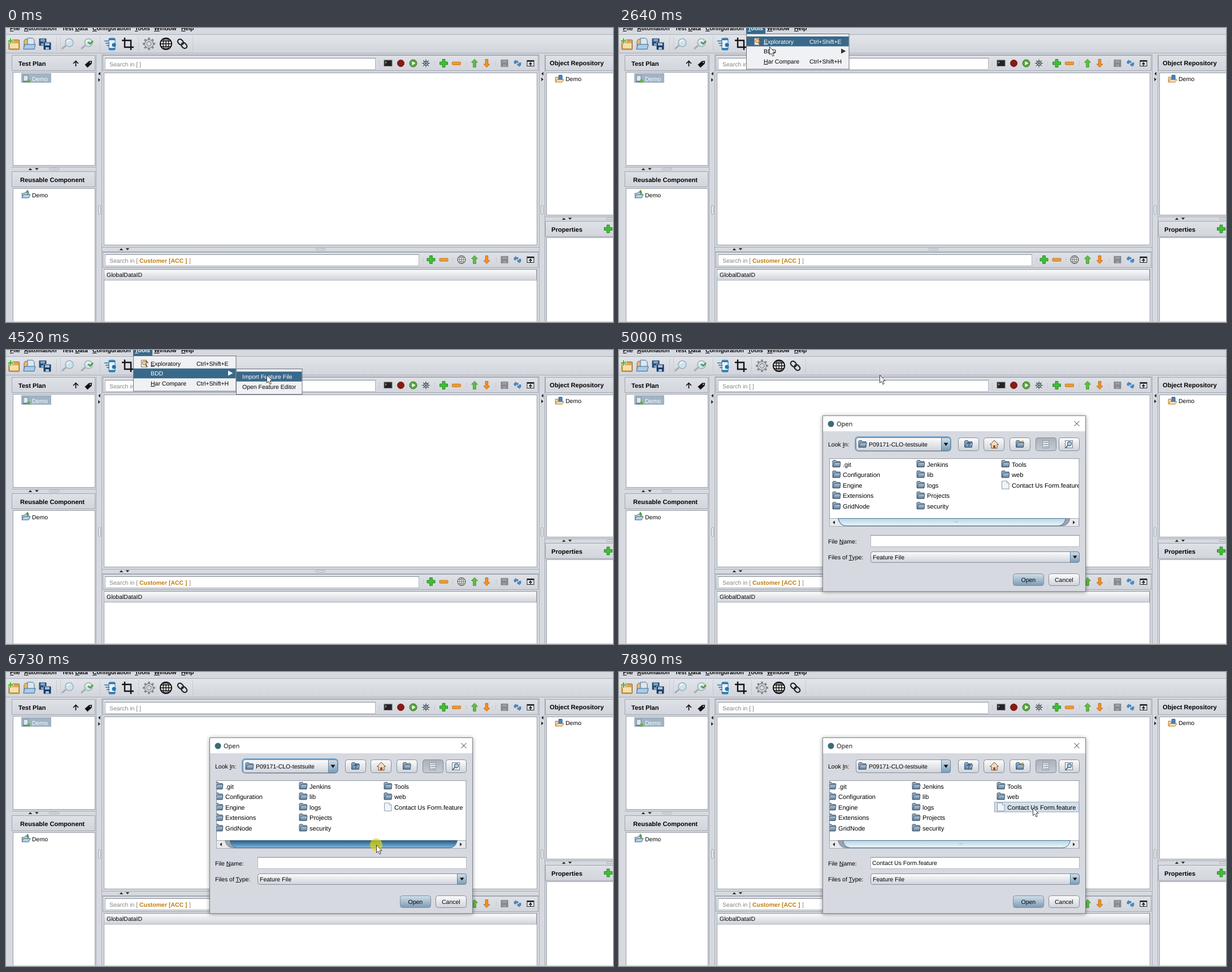
These frames come from a looping animation (1074 by 521 pixels, 8 s). An HTML page:

```html
<!DOCTYPE html>
<html lang="en">
<head>
<meta charset="utf-8">
<title>Importing a feature file</title>
<style>
html, body { margin: 0; width: 100%; height: 100%; overflow: hidden; background: #d6d9df; }
svg { display: block; width: 1074px; height: 521px; }
text { font: 10.5px "Liberation Sans", Arial, sans-serif; white-space: pre; text-rendering: geometricPrecision; }
.b { font-weight: bold; }
.h { font-weight: bold; font-size: 11.1px; }
.m { font-weight: bold; font-size: 10.35px; }
.f { font-size: 11.1px; }
.w { font: 11px "Open Sans", "Noto Sans", sans-serif; }
.frame { filter: drop-shadow(0 1px 3.5px #0006); }
tspan { text-decoration: underline; }
.row rect { fill: none; }
.row path { fill: #333; }
.on rect { fill: #39698a; }
.on text, .on path { fill: #fff; }
</style>
</head>
<body>
<svg id="stage" viewBox="0 0 1074 521"></svg>
<script>
// "_" before a letter marks its keyboard mnemonic
const text = (x, y, s, cls = '', fill = '#000') =>
  `<text x="${x}" y="${y}" class="${cls}" fill="${fill}">${s.replace(/_(.)/, '<tspan>$1</tspan>')}</text>`;
const rect = (x, y, w, h, fill, stroke = 'none', r = 0) =>
  `<rect x="${x}" y="${y}" width="${w}" height="${h}" fill="${fill}" stroke="${stroke}" rx="${r}"/>`;
const path = (d, fill = 'none', stroke = 'none', w = 1) =>
  `<path d="${d}" fill="${fill}" stroke="${stroke}" stroke-width="${w}"/>`;
const circle = (x, y, r, fill, stroke = 'none', w = 1) =>
  `<circle cx="${x}" cy="${y}" r="${r}" fill="${fill}" stroke="${stroke}" stroke-width="${w}"/>`;
const group = (id, body, attrs = '') => `<g id="${id}" ${attrs}>${body}</g>`;
const icon = (name, x, y) => `<use href="#${name}" x="${x}" y="${y}"/>`;
const grad = (id, a, b) => `<linearGradient id="${id}" x2="0" y2="1"><stop stop-color="${a}"/><stop offset="1" stop-color="${b}"/></linearGradient>`;
const dots = (x, y, h) => `<path d="M${x} ${y}v${h}" stroke="#a3a8b1" stroke-dasharray="1 2"/>`;
const pane = (x, y, w, h) => rect(x + .5, y + .5, w, h, '#fff', '#979ca6');
const header = (x, y, w, h = 27) => rect(x + .5, y + .5, w, h, 'url(#head)', '#a0a5af');
const field = (x, y, w, h) => rect(x + .5, y + .5, w, h, '#fff', '#b3b7bf') + path(`M${x} ${y + .5}h${w + 1}`, 'none', '#858a93');
const button = (x, y, w, h, fill = 'light') => rect(x + .5, y + .5, w, h, `url(#${fill})`, '#858c98', 4);
const grip = (x, y, w, h) => rect(x + .5, y + .5, w, h, '#e3e6eb', '#a0a5ae', 2);
const tri = (x, y, turn) => `<path d="M-3.3 1.8L0-1.8 3.3 1.8z" fill="#222" transform="translate(${x} ${y}) rotate(${turn})"/>`;

const floppy = (c, light) => rect(-6.5, -6.5, 13, 13, c, 'none', 1) + rect(-4, -5.5, 8, 4.5, light) + rect(-3, 2, 6, 4, light);
const globe = (r, c, w) => circle(0, 0, r, '#f4f4f4', c, w) +
  path(`M${-r} 0H${r}M0 ${-r}V${r}M${-r * .85} ${-r * .5}H${r * .85}M${-r * .85} ${r * .5}H${r * .85}`, 'none', c, w * .7) +
  `<ellipse rx="${r * .5}" ry="${r}" fill="none" stroke="${c}" stroke-width="${w * .7}"/>`;
const arrow = (fill, edge) => path('M0-7.2L5.5-1.5H2.3V7H-2.3V-1.5H-5.5z', fill, edge, .9);
const lens = path('M-3 3L-10 9', 'none', '#a9adb2', 3) + circle(3, -2, 7, '#c9e4f1', '#a5aeb8', 1.6) + path('M-1-3q2-5 6-3', 'none', '#fff', 1.5);
const gear = (r, hole, c, w) => Array.from({ length: 8 }, (_, i) =>
  `<path d="M0 ${-r}V${-r + 4}" stroke="${c}" stroke-width="${w}" transform="rotate(${i * 45})"/>`).join('') + circle(0, 0, r - 3.5, '#dcdfe2', c, 1.3) + circle(0, 0, hole, '#d6d9df', c, 1.3);

const icons = {
  plus: path('M-2.4-7H2.4V-2.4H7V2.4H2.4V7H-2.4V2.4H-7V-2.4H-2.4z', '#43bd35', '#248a20'),
  minus: rect(-7.5, -2.3, 15, 5, '#f09a35', '#c87619', 1),
  up: arrow('#61bd43', '#3e922c'),
  down: `<g transform="rotate(180)">${arrow('#f28e27', '#c06a12')}</g>`,
  floppy: floppy('#85878a', '#9c9ea1'),
  refresh: path('M-6 0V-3L-3-6V-4H1V-1H-3V1zM6-1V3L3 6V4H0V1H3V-1z', '#468bc9', '#2c6da8', .6),
  popout: rect(-6, -5, 12, 10, '#e9edf1', '#222') + path('M-6-4H6', 'none', '#222', 2.5) + path('M0 5V0M-2.5 2L0-1 2.5 2', 'none', '#222', 1.5),
  globe: globe(7, '#555', 1.1),
  bigGlobe: globe(10, '#111', 2),
  console: rect(-7, -5.5, 14, 10.5, '#222', '#666') + path('M-5-3L-3-1.5-5 0', 'none', '#ddd'),
  record: circle(0, 0, 6, '#8b1a13', '#6c1712'),
  play: circle(0, 0, 6.5, '#5aa63e', '#39782b') + path('M-2-3.5L4 0-2 3.5z', '#fff'),
  debug: gear(7, 1, '#33434c', 1),
  gear: gear(11, 4, '#85878a', 3.5),
  newDoc: rect(-9, -7, 18.5, 17, '#d9a755', '#8f6424', 1) + rect(-7, -1, 15, 9, '#f5dfa9') +
    `<g transform="translate(-6 -5) scale(.75)"><path d="M-2-7H2V-2H7V2H2V7H-2V2H-7V-2H-2z" fill="#4bb52f" stroke="#fff"/></g>`,
  openDoc: path('M-9-5L-7-8H-1L1-5H7V8H-9z', '#e3bd78', '#8e6b35') + path('M-3-10H6L9-7V2H-3z', '#dbe8f2', '#4d6f8d') + path('M-10 9.5L-8 1H11L9 9.5z', '#a9cbe6', '#3b6791'),
  saveAll: `<g transform="translate(-4 -3)">${floppy('#254b79', '#7fa3c4')}</g><g transform="translate(4 4)">${rect(-7, -7, 14, 14, '#d6d9df')}${floppy('#173c68', '#a9c3da')}</g>`,
  lens,
  lensOk: lens + path('M2-3L6 0 11-5', 'none', '#4a9f2d', 2.5),
  phone: rect(-3, -10, 11, 21, '#e9f1f7', '#2373ad', 2) + path('M-3-8H8M-3 9H8', 'none', '#2373ad', 3) + path('M-11-5H-3M-9-1H-2M-7 3H-2', 'none', '#2373ad', 1.5) + circle(6, 2, 3.5, '#2373ad'),
  crop: path('M-5-11V6H11M-10-6H6V11', 'none', '#111', 2.4),
  link: `<g transform="rotate(45)" fill="none" stroke="#222" stroke-width="2.2"><rect x="-10" y="-4" width="11" height="8" rx="4"/><rect x="-1" y="-4" width="11" height="8" rx="4"/></g>`,
  upLine: path('M0 5V-4M-4.5 0L0-4.5 4.5 0', 'none', '#111', 1.7),
  tag: `<g transform="rotate(-42)">${path('M-7-3.5H3L7 0 3 3.5H-7z', '#111')}${circle(3, 0, 1.1, '#ddd')}</g>`,
  plan: path('M-5-6H3V4H-5z', '#dce6ed', '#71838f') + path('M-6 5H5', 'none', '#657b89', 2) + circle(4, 4, 3, '#69af46'),
  reuse: path('M-7-2H-3L-1-4H5V5H-6z', '#e8d6a6', '#386e99') + path('M-7 6L-4 0H8L5 6z', '#b5d5ec', '#2f648f') + path('M3 0V-6M1-4L3-7 5-4', 'none', '#54983b', 1.6),
  repo: path('M-7-3H-3L-2-1H5V5H-7z', '#f0d49a', '#b47d36') + rect(-1, -6.5, 6, 8, '#4a84b9', '#2a5a89', 1) + path('M-7 6L-4 1.5H8L5 6z', '#f4dfb3', '#b47d36'),
  explore: rect(-5, -6, 9, 12, '#fff', '#777') + circle(0, -1, 3.6, '#f0c98b', '#a77339') + path('M2 2L6 6M3-5L7-1', 'none', '#6b4b2a', 1.7),
  folder: path('M-6.5 5V-5.5L-5.5-6.5H-1L0-4.5H6.5V5z', '#8fa9bf', '#40566c') + path('M-6 5.5L-3.5-2.5H7.5L6 5.5z', 'url(#folderFill)', '#40566c'),
  file: path('M-6-7H3L6.5-3.5V7H-6z', '#eff4f8', '#8c99a8') + path('M3-7V-3.5H6.5', '#fff', '#8c99a8')
};

const defs = `<defs>${grad('head', '#dee1e6', '#d2d5dc')}${grad('bar', '#e2e5ea', '#d2d5db')}${grad('light', '#fcfcfd', '#cfd3da')}
  ${grad('blue', '#d0dfea', '#7c9bb5')}${grad('pressed', '#abb0b9', '#c6cad2')}${grad('folderFill', '#b8cddd', '#5a7a97')}
  ${grad('thumbIdle', '#b9d3e5', '#e9f7ff')}${grad('thumbHover', '#7eaacb', '#c2e5fa')}${grad('thumbDown', '#245a87', '#7fb8de')}
  <clipPath id="list"><rect x="372" y="193" width="441.5" height="105"/></clipPath>
  ${Object.entries(icons).map(([id, body]) => group(id, body)).join('')}</defs>`;

const menuBar = [[7, '_File'], [32, '_Automation'], [99, 'Test _Data'], [153, '_Configuration'], [228, '_Tools'], [262, '_Window'], [310, '_Help']]
  .map(([x, s]) => text(x, 4, s, 'm')).join('');

const topBar = rect(0, 11, 1074, 33, 'url(#bar)') + path('M0 11.5H1074M0 44.5H1074', 'none', '#a7acb5') +
  [['newDoc', 14], ['openDoc', 41], ['saveAll', 69], ['lens', 109], ['lensOk', 143], ['phone', 185], ['crop', 215], ['gear', 253], ['bigGlobe', 283], ['link', 312]]
    .map(([n, x]) => icon(n, x, 28)).join('') + [89.5, 96.5, 166.5, 234.5, 330.5].map(x => dots(x, 15, 27)).join('');

const shared = y => [['up', 829], ['down', 850.5], ['floppy', 882], ['refresh', 905], ['popout', 928]].map(([n, x]) => icon(n, x, y)).join('');
const edges = path('M159.5 47V521M169.5 47V521M943.5 47V521M953.5 47V521M10 246.5H159M170 388.5H943M170 396.5H943M954 334.5H1074M170 47.5H943', 'none', '#a5aab3');

const left = header(10, 48, 147) + text(22, 67, 'Test Plan', 'h') + icon('upLine', 123.5, 63) + icon('tag', 147, 63) +
  pane(12, 78, 145, 165) + rect(27, 80, 53, 17, '#9fb4c4') + icon('plan', 36, 90) + text(46, 93.7, 'Demo', '', '#fff') +
  tri(43, 250, 0) + tri(54.5, 250, 180) + grip(76, 248, 17, 3) +
  header(10, 254, 147) + text(25, 273, 'Reusable Component', 'h') + pane(12, 284, 145, 240) + icon('reuse', 35, 295) + text(46, 299.5, 'Demo') +
  tri(165, 81, -90) + tri(165, 92, 90) + grip(163, 314, 4, 16);

const center = header(171, 48, 770) + field(175, 53, 478, 20) + text(183, 67.5, 'Search in [ ]', '', '#858585') +
  [['console', 676], ['record', 698.5], ['play', 720.5], ['debug', 743], ['plus', 774.5], ['minus', 797]].map(([n, x]) => icon(n, x, 62.5)).join('') + shared(62.5) +
  [660.5, 758.5, 814.5, 866.5].map(x => dots(x, 59, 9)).join('') +
  pane(173, 79, 766, 305) + tri(204, 392, 0) + tri(215, 392, 180) + grip(548, 390, 16, 3) +
  header(171, 397, 770) + field(175, 401, 555, 20) + text(183, 415.5, 'Search in [', '', '#858585') +
  text(236, 415.5, 'Customer [ACC ]', 'b', '#c17d09') + text(324, 415.5, ']', '', '#858585') +
  icon('plus', 752, 410.5) + icon('minus', 774.5, 410.5) + icon('globe', 806, 410.5) + shared(410.5) +
  [738.5, 790.5, 867.5].map(x => dots(x, 407, 9)).join('') +
  pane(173, 427, 766, 100) + rect(173.5, 428, 765, 19, 'url(#light)', '#aaafb8') + text(178, 441.3, 'GlobalDataID');

const right = header(954, 48, 140) + text(962, 66.3, 'Object Repository', 'h') + pane(956, 79, 140, 252) + icon('repo', 979, 90) + text(990, 94, 'Demo') +
  tri(987, 338, 0) + tri(998, 338, 180) + grip(1062, 336, 17, 3) + header(954, 342, 140) + text(965, 360.5, 'Properties', 'h') + icon('plus', 1065.5, 356) +
  pane(956, 371, 140, 160) + tri(949, 81, -90) + tri(949, 91, 90) + grip(946, 314, 4, 16);

const row = (id, x, y, w, label, textX, key = '') => group(id, rect(x, y, w, 17.5, 'none') + text(textX, y + 12.5, label) + text(337, y + 12.5, key), 'class="row"');
const menu = group('menu',
  rect(225, 0, 34, 10, '#39698a') + text(228, 4, '_Tools', 'm', '#fff') +
  rect(225.5, 10.5, 181.5, 62.5, '#f0f1f4', '#6b717b') +
  row('exploratory', 226, 15, 180.5, '_Exploratory', 256, 'Ctrl+Shift+E') + icon('explore', 244.5, 24) +
  group('bdd', rect(226, 32.7, 180.5, 17.5, 'none') + text(256, 45.3, 'BDD') + path('M393 36.5L401.5 41 393 45.5z'), 'class="row"') +
  row('har', 226, 50.3, 180.5, '_Har Compare', 256, 'Ctrl+Shift+H') +
  group('submenu', rect(407.5, 33.5, 116.5, 45, '#f0f1f4', '#6b717b') +
    row('import', 408, 38.3, 115.5, 'Import Feature File', 418) + row('editor', 408, 56, 115.5, 'Open Feature Editor', 418)));

const columns = [
  [377, ['.git', 'Configuration', 'Engine', 'Extensions', 'GridNode']],
  [526, ['Jenkins', 'lib', 'logs', 'Projects', 'security']],
  [676, ['Tools', 'web', 'Contact Us Form.feature']]
];
const files = columns.map(([x, names]) => names.map((name, i) => {
  const y = 202.5 + i * 18.6;
  return icon(/\.feature/.test(name) ? 'file' : 'folder', x + 7.5, y - .5) + text(x + 19, y + 4, name, 'f');
}).join('')).join('');

const pill = (a, b) => `M${a} 298.5Q${a + 3} 311.5 ${a + 14} 311.5H${b - 14}Q${b - 3} 311.5 ${b} 298.5z`;
const scrollbar = rect(372.5, 298.5, 441, 14, '#e8eaee', '#a5aab3') + path(pill(387.5, 798), '#9aa3ad', '#7d8793') +
  group('thumb', path(pill(388, 790.5), 'url(#thumbIdle)', '#4d7493') + path('M594 304.5h6', 'none', '#6e90aa80')) +
  tri(380, 305.5, -90) + tri(805, 305.5, 90);

const toolButtons = [600, 645, 691, 737, 778].map((x, i) => button(x, 155, 36, 23, i === 3 ? 'pressed' : 'light')).join('') +
  icon('folder', 618, 167) + path('M619 171V165M616 167L619 163 622 167', 'none', '#2767a0', 1.5) +
  path('M656.5 167.5L664 160 671.5 167.5H669V174H659V167.5z', '#f1dcc0', '#744d2b') + rect(662, 169, 4, 5, '#a34d27') +
  icon('folder', 709, 167) + path('M714 160v4M712 162h4', 'none', '#dba332', 1.3) +
  rect(749.5, 160.5, 11, 13, '#dce2e9', '#8b939d') + path('M751 163.5h2M754 163.5h5M751 167.5h2M754 167.5h5M751 171.5h2M754 171.5h5', 'none', '#6d8091') +
  rect(789.5, 160.5, 13, 13, '#e9eef3', '#78828d') + circle(797, 166, 3.5, '#b5d4e7', '#445e73', 1.3) + path('M794 169L790 174', 'none', '#445e73', 2);

const dialog = group('dialog',
  `<g class="frame">${rect(360.5, 116.5, 465, 311.5, '#d6d9df', '#7d838c')}</g>` + rect(361, 117, 464, 27, '#fff') +
  circle(375, 131, 5.5, '#3b6b78') + text(385, 135, 'Open', 'w') + path('M805.5 126L814.5 135M814.5 126L805.5 135', 'none', '#333') +
  text(370, 171, 'Look _In:') +
  group('focus', rect(418.3, 154.3, 168.4, 24.4, 'none', '#6fa2cf', 5), 'stroke-width="2.4"') +
  button(419, 155, 167, 23) + path('M570.5 155.5H582.5Q586.5 155.5 586.5 159.5V174.5Q586.5 178.5 582.5 178.5H570.5z', 'url(#blue)', '#63819c') + path('M574.5 164.5h8L578.5 170z', '#111') +
  icon('folder', 430.5, 167) + text(442, 171, 'P09171-CLO-testsuite') + toolButtons +
  rect(372.5, 192.5, 441.5, 120, '#fff', '#949aa4') +
  `<g clip-path="url(#list)">${group('files', group('picked', rect(672.5, 230.5, 149, 17.5, '#d4dfe9', '#8da6bd')) + files)}</g>` + scrollbar +
  text(370, 342.5, 'File _Name:') + field(445, 328, 369, 20) + group('fileName', text(448, 342.3, 'Contact Us Form.feature')) +
  text(370, 371, 'Files of _Type:') + button(445, 357, 369, 19) + path('M798.5 357.5H810.5Q814.5 357.5 814.5 361.5V372.5Q814.5 376.5 810.5 376.5H798.5z', 'url(#blue)', '#63819c') +
  path('M803 364.5h7.5L806.7 369.5z', '#111') + text(449, 371, 'Feature File') +
  button(697, 396, 54, 21, 'blue') + text(711.5, 411, 'Open') + button(760, 396, 54, 21) + text(771, 411, 'Cancel'));

const cursor = group('cursor', circle(0, 0, 11, '#e6d900').replace('/>', ' id="press" fill-opacity=".68"/>') +
  path('M.5 .5V14.3L3.6 11.6 5.9 16.8 8.2 15.8 6 10.7H10.2z', '#fff', '#222', .9));

const stage = document.getElementById('stage');
stage.innerHTML = defs + rect(0, 0, 1074, 521, '#d6d9df') + menuBar + topBar + edges + left + center + right +
  path('M0 520.5H1074', 'none', '#c5cad2') + menu + dialog + cursor;

const el = id => document.getElementById(id);
const show = (id, on) => el(id).style.display = on ? '' : 'none';
const light = (id, on) => el(id).classList.toggle('on', on);

// time, x, y of the pointer tip
const route = [
  [500, 1012, 500], [830, 320, -18], [1180, 207, -12], [1380, 238, 14], [1520, 255, 25], [1720, 245, 1],
  [2400, 245, 1], [2640, 266, 33], [2980, 267, 37], [3200, 267, 37], [3450, 427, 43], [3860, 461, 44],
  [5400, 461, 44], [6260, 648, 306], [6450, 648, 306], [6730, 655, 306], [6900, 655, 306], [7140, 692, 282], [7740, 732, 240]
];
function pointAt(t) {
  const i = route.findIndex(p => p[0] > t);
  if (i < 0) return route.at(-1).slice(1);
  if (!i) return [-50, -50];
  const [t0, x0, y0] = route[i - 1], [t1, x1, y1] = route[i], k = (t - t0) / (t1 - t0);
  return [x0 + (x1 - x0) * k, y0 + (y1 - y0) * k];
}

function draw(t) {
  const within = (a, b) => t >= a && t < b;
  const [x, y] = pointAt(t);
  el('cursor').setAttribute('transform', `translate(${x} ${y})`);
  show('cursor', t >= 500 && !within(830, 1180));
  show('press', within(1990, 2050) || within(4320, 4520) || within(6390, 6900) || within(7740, 7890));

  show('menu', within(1990, 5000));
  show('submenu', t >= 3180);
  light('exploratory', within(2500, 2700));
  light('bdd', t >= 2700);
  light('import', t >= 3410);

  const shift = 8 * Math.min(1, Math.max(0, (t - 6450) / 280));
  show('dialog', t >= 5000);
  show('focus', t < 7740);
  show('picked', t >= 7740);
  show('fileName', t >= 7890);
  el('files').setAttribute('transform', `translate(${-shift})`);
  el('thumb').setAttribute('transform', `translate(${shift})`);
  const state = within(6390, 6900) ? 'Down' : y > 298 && t > 5460 ? 'Hover' : 'Idle';
  el('thumb').firstChild.setAttribute('fill', `url(#thumb${state})`);
}

const start = performance.now();
function tick() {
  draw((performance.now() - start) % 8000);
  requestAnimationFrame(tick);
}
tick();
</script>
</body>
</html>
```
